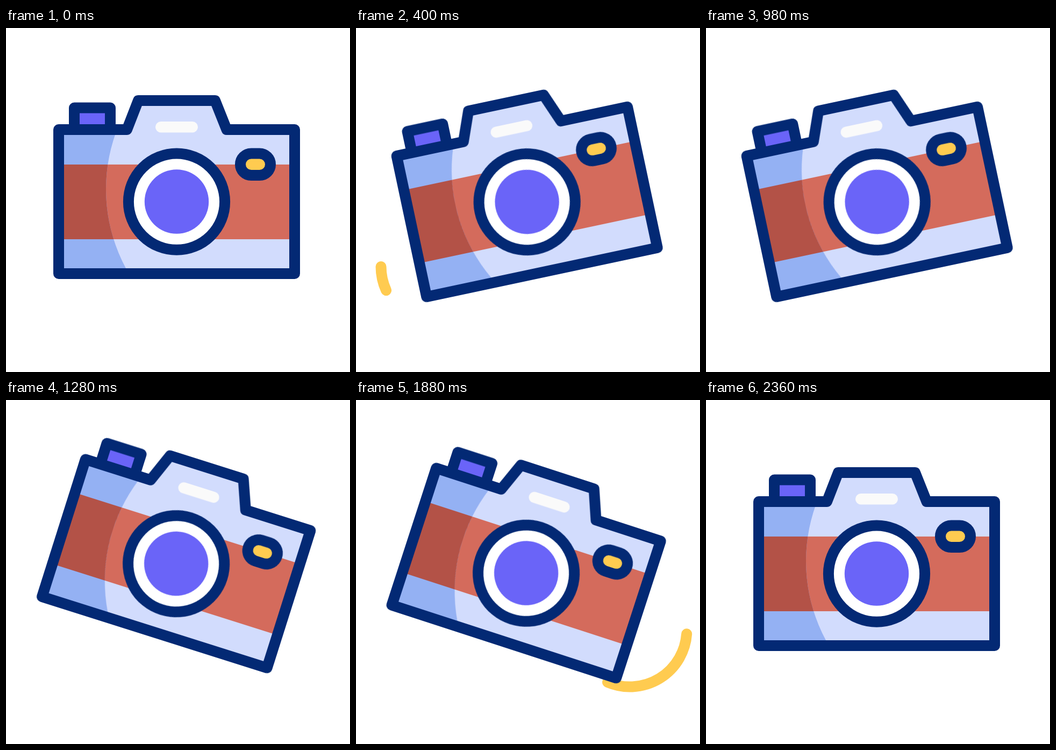
An HTML page that plays this animation: 640x640 px, repeating every 3.22 s.

```html
<!DOCTYPE html>
<html lang="en">
<head>
<meta charset="utf-8">
<title>Camera</title>
<style>
  html, body { margin: 0; width: 100%; height: 100%; overflow: hidden; background: #fff; }
  svg { display: block; width: 100%; height: 100%; }

  .hop, .tilt, .shutter, .arc, .rays path { animation: 3220ms linear infinite; }
  .hop { animation-name: hop; animation-timing-function: cubic-bezier(.37, 0, .63, 1); }
  .tilt { animation-name: tilt; animation-timing-function: cubic-bezier(.25, 1, .5, 1); transform-origin: 320px 320px; }
  .shutter { animation-name: press; animation-timing-function: ease-in-out; }
  .arc, .rays path { fill: none; stroke: #ffcb50; stroke-width: 20; stroke-linecap: round; stroke-dasharray: 100 200; stroke-dashoffset: 101; }
  .arc { animation-timing-function: cubic-bezier(.37, 0, .63, 1); }
  .left { animation-name: sweep-left; }
  .right { animation-name: sweep-right; }
  .rays path { animation-name: flash; }
  .line { stroke: #032974; stroke-width: 20; stroke-linejoin: round; }

  @keyframes hop {
    0%, 5.28%, 10.25%, 35.81%, 40.78%, 100% { transform: translateY(0); }
    8.23%, 38.76% { transform: translateY(-36px); }
  }
  @keyframes tilt {
    0%, 5.28% { transform: rotate(0deg); }
    11.18%, 35.81% { transform: rotate(-12deg); }
    41.71%, 63.98% { transform: rotate(18deg); }
    73.29%, 100% { transform: rotate(0deg); }
  }
  @keyframes press {
    0%, 14.29%, 24.22%, 44.82%, 54.75%, 100% { transform: translateY(0); }
    17.39%, 21.12%, 47.92%, 51.65% { transform: translateY(19.6px); }
  }
  @keyframes sweep-left {
    0%, 10.25% { stroke-dashoffset: 101; }
    17.39%, 19.88% { stroke-dashoffset: 0; }
    26.09%, 100% { stroke-dashoffset: -101; }
  }
  @keyframes sweep-right {
    0%, 40.78% { stroke-dashoffset: 101; }
    47.92%, 57.64% { stroke-dashoffset: 0; }
    63.85%, 100% { stroke-dashoffset: -101; }
  }
  @keyframes flash {
    0%, 17.55%, 23.15%, 48.08% { stroke-dashoffset: 101; }
    20.34%, 50.87% { stroke-dashoffset: 0; }
    23.14%, 53.67%, 100% { stroke-dashoffset: -101; }
  }
</style>
</head>
<body>
<svg viewBox="0 0 640 640">
  <defs>
    <path id="body" d="M98 189H225L246 135H389L410.5 189H537V457H98Z"/>
    <clipPath id="inside"><use href="#body"/></clipPath>
    <clipPath id="shade"><path clip-rule="evenodd" d="M90 120H550V470H90ZM186 300a310 310 0 1 0 620 0a310 310 0 1 0 -620 0Z"/></clipPath>
  </defs>

  <path class="arc left" pathLength="100" d="M46.5 444A106 106 0 0 0 203.5 536.9"/>
  <path class="arc right" pathLength="100" d="M615.5 427.5A106 106 0 0 1 468.1 525.1"/>

  <g class="hop">
    <g class="tilt">
      <g class="rays">
        <path pathLength="100" d="M129.7 130.3L105.3 96.3"/>
        <path pathLength="100" d="M160 122.5V82"/>
        <path pathLength="100" d="M189 128L213.8 94"/>
      </g>
      <path class="shutter line" fill="#6a64f8" d="M127 189V148.5H194V189"/>

      <g clip-path="url(#inside)">
        <path fill="#d2dcfd" d="M90 120H550V470H90Z"/>
        <path fill="#d46b5c" d="M90 254H550V393H90Z"/>
        <g clip-path="url(#shade)">
          <path fill="#94b1f3" d="M90 120H240V470H90Z"/>
          <path fill="#b35247" d="M90 254H240V393H90Z"/>
        </g>
      </g>
      <use href="#body" class="line" fill="none"/>

      <rect x="278" y="174" width="79" height="20.4" rx="10.2" fill="#fafafa"/>
      <rect class="line" x="436" y="233.5" width="56" height="40.6" rx="20.3" fill="#ffcb50"/>
      <circle class="line" cx="317.5" cy="323.2" r="89.6" fill="#fff"/>
      <circle cx="317.5" cy="323" r="59.7" fill="#6a64f8"/>
    </g>
  </g>
</svg>
</body>
</html>
```
